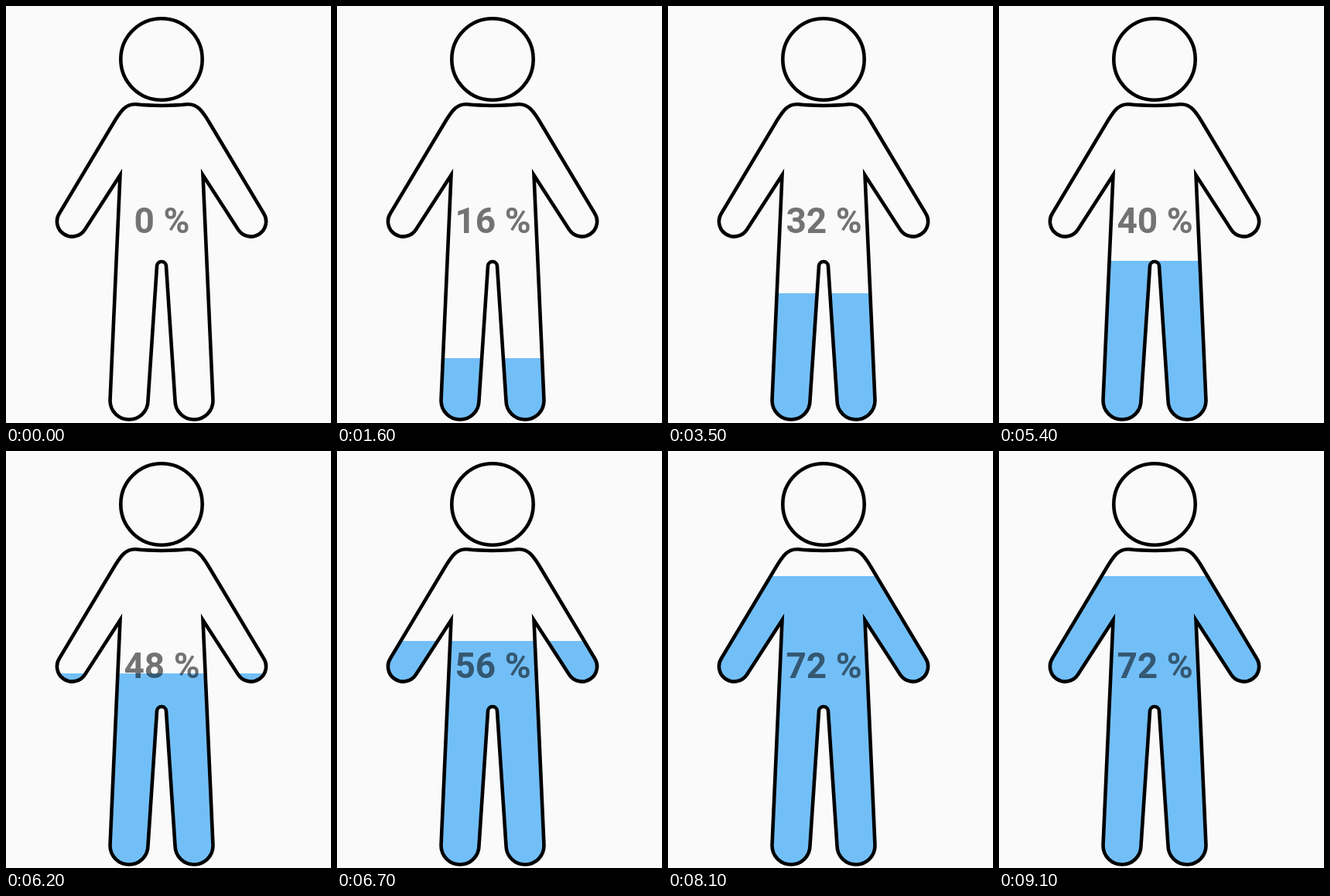
An HTML page that plays this animation: 420 by 540 pixels, repeating every 10000 ms.

```html
<!DOCTYPE html>
<html lang="en">
<head>
<meta charset="utf-8">
<title>Body fill level</title>
<style>
  html, body { margin: 0; height: 100%; overflow: hidden; background: #fafafa; }
  svg { display: block; }
  text { font: bold 46px Roboto, sans-serif; fill: rgba(0, 0, 0, .54); text-anchor: middle; }
</style>
</head>
<body>
<svg width="420" height="540" viewBox="0 0 420 540">
  <defs>
    <path id="body" d="M201 129 Q182 128.7 168 127.3
      C155 126.3 148.5 136 141 148 L69 268.5
      A19.5 19.5 0 0 0 102 289.5 L147.5 219 L134.5 511
      A24.5 24.5 0 0 0 183.5 511 L195 337
      A6 6 0 0 1 207 337 L218.5 511
      A24.5 24.5 0 0 0 267.5 511 L254.5 219 L300 289.5
      A19.5 19.5 0 0 0 333 268.5 L261 148
      C253.5 136 247 126.3 234 127.3 Q220 128.7 201 129 Z"/>
    <clipPath id="inside">
      <use href="#body"/>
      <circle cx="201" cy="69" r="52.7"/>
    </clipPath>
  </defs>
  <g clip-path="url(#inside)">
    <rect id="water" width="420" height="540" fill="#72bff8"/>
  </g>
  <g fill="none" stroke="#000" stroke-width="4.6">
    <circle cx="201" cy="69" r="52.7"/>
    <use href="#body"/>
  </g>
  <text id="label" x="201.5" y="294">0 %</text>
</svg>
<script>
  const LOOP = 10000, STEP = 8, PX_PER_PERCENT = 5.25;
  // Each moment adds one step to the level.
  const jumps = [300, 1300, 2400, 3400, 4500, 5500, 6300, 7200, 7900];
  const water = document.getElementById('water');
  const label = document.getElementById('label');
  const start = performance.now();

  function draw() {
    const t = Math.max(0, performance.now() - start) % LOOP;
    const percent = STEP * jumps.filter(j => t >= j).length;
    water.setAttribute('y', 540 - percent * PX_PER_PERCENT);
    label.textContent = percent + ' %';
    requestAnimationFrame(draw);
  }
  draw();
</script>
</body>
</html>
```
